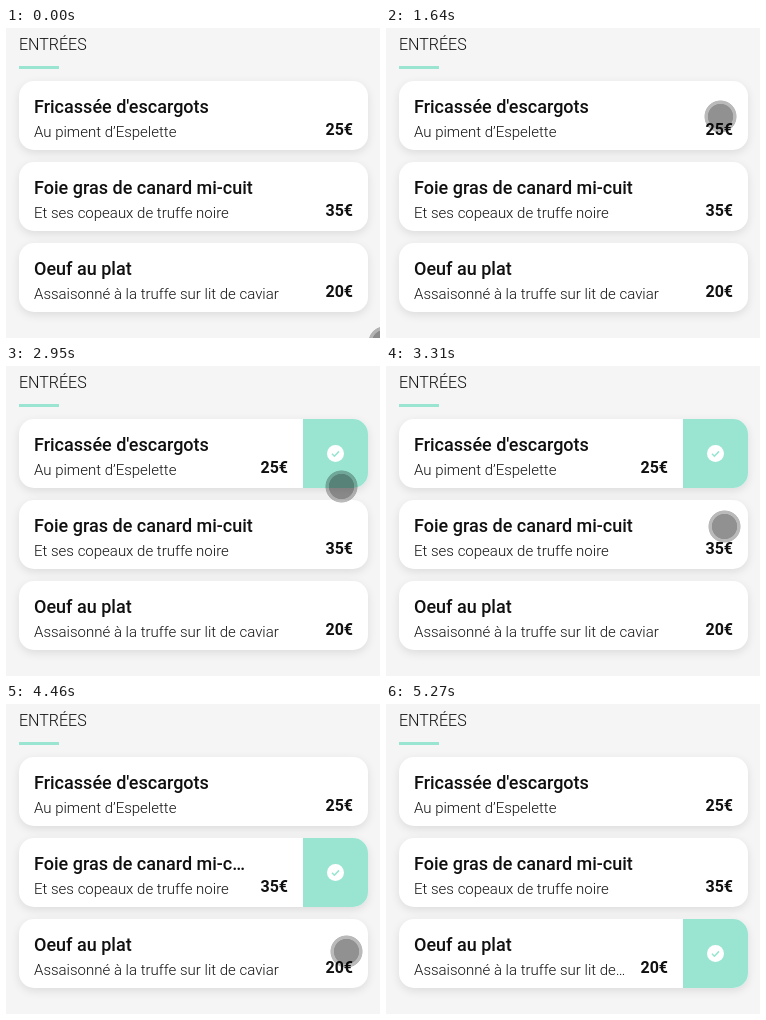
An HTML page that plays this animation: 374x310 px, repeating every 6.33 s.

```html
<!DOCTYPE html>
<html lang="fr">
<head>
<meta charset="utf-8">
<title>Entrées</title>
<style>
@property --open { syntax: "<length>"; inherits: true; initial-value: 0px; }

html, body { margin: 0; width: 100%; height: 100%; overflow: hidden; }
body { background: #f5f5f5; color: #101010; font-family: Roboto, sans-serif; }
.stage { position: relative; width: 374px; height: 310px; overflow: hidden; }

h1 {
  position: absolute; left: 13px; top: 7px; margin: 0;
  font-size: 16px; font-weight: 300; line-height: 20px;
}
.bar { position: absolute; left: 13px; top: 38px; width: 40px; height: 3px; background: #99e5d1; }

.card {
  position: absolute; left: 13px; width: 349px; height: 69px;
  border-radius: 15px; background: #fff; overflow: hidden;
  box-shadow: 0 3px 10px rgba(0, 0, 0, .1);
  animation: 6330ms infinite;
}
.card:nth-of-type(2) { top: 53px; animation-name: first; }
.card:nth-of-type(3) { top: 134px; animation-name: second; }
.card:nth-of-type(4) { top: 215px; animation-name: third; }

h2, p {
  position: absolute; left: 15px; right: calc(57px + var(--open) + 65px - 65px); margin: 0;
  overflow: hidden; white-space: nowrap; text-overflow: ellipsis;
}
h2 { top: 15px; font-size: 18px; font-weight: 500; line-height: 22px; }
p { top: 42px; font-size: 15px; font-weight: 300; line-height: 18px; }
b {
  position: absolute; top: 39px; right: calc(15px + var(--open));
  font-size: 16px; font-weight: 700; line-height: 20px;
}
.check {
  position: absolute; top: 0; right: calc(var(--open) - 65px);
  width: 65px; height: 69px; background: #99e5d1;
}
.check svg { position: absolute; left: 24px; top: 26px; width: 17px; height: 17px; }

.cursor {
  position: absolute; width: 33px; height: 33px; margin: -16.5px;
  background: radial-gradient(circle, rgba(0, 0, 0, .43) 12.3px, rgba(0, 0, 0, .27) 13px 15.7px, transparent 16.4px);
  animation: across 6330ms infinite, down 6330ms infinite;
}

@keyframes first {
  0%, 33.33% { --open: 0px; }
  37.36%, 54.58% { --open: 65px; }
  58.29%, 100% { --open: 0px; }
}
@keyframes second {
  0%, 54.58% { --open: 0px; }
  58.29%, 72.67% { --open: 65px; }
  76.38%, 100% { --open: 0px; }
}
@keyframes third {
  0%, 72.67% { --open: 0px; }
  76.38%, 100% { --open: 65px; }
}

@keyframes across {
  0%, 3.16% { left: 378px; animation-timing-function: ease-in; }
  4.1% { left: 394px; animation-timing-function: step-end; }
  20.83% { left: 339px; animation-timing-function: ease-in-out; }
  22.9% { left: 327px; animation-timing-function: ease-in-out; }
  25.9%, 41.55% { left: 334px; animation-timing-function: ease-in-out; }
  52.28%, 59.72% { left: 338px; animation-timing-function: ease-in-out; }
  65.4% { left: 342px; animation-timing-function: ease-in-out; }
  70.45%, 76.62% { left: 340px; animation-timing-function: cubic-bezier(.32, 0, .67, 0); }
  83.25%, 100% { left: 379px; }
}
@keyframes down {
  0%, 3.16% { top: 314px; animation-timing-function: ease-in; }
  4.1% { top: 330px; animation-timing-function: step-end; }
  20.83% { top: 15px; animation-timing-function: cubic-bezier(.2, .4, .5, 1); }
  25.9%, 41.55% { top: 88px; animation-timing-function: ease-in-out; }
  52.28%, 59.72% { top: 160px; animation-timing-function: cubic-bezier(.45, 0, .55, 1); }
  70.45%, 76.62% { top: 247px; animation-timing-function: cubic-bezier(.32, 0, .67, 0); }
  83.25%, 100% { top: 331px; }
}
</style>
</head>
<body>
<div class="stage">
  <h1>ENTRÉES</h1>
  <div class="bar"></div>
  <div class="card">
    <h2>Fricassée d'escargots</h2>
    <p>Au piment d’Espelette</p>
    <b>25€</b>
    <div class="check"><svg viewBox="0 0 17 17"><circle cx="8.5" cy="8.5" r="8.5" fill="#fff"/><path d="M5 8.8l2.4 2.4 4.6-4.8" fill="none" stroke="#99e5d1" stroke-width="1.6"/></svg></div>
  </div>
  <div class="card">
    <h2>Foie gras de canard mi-cuit</h2>
    <p>Et ses copeaux de truffe noire</p>
    <b>35€</b>
    <div class="check"><svg viewBox="0 0 17 17"><circle cx="8.5" cy="8.5" r="8.5" fill="#fff"/><path d="M5 8.8l2.4 2.4 4.6-4.8" fill="none" stroke="#99e5d1" stroke-width="1.6"/></svg></div>
  </div>
  <div class="card">
    <h2>Oeuf au plat</h2>
    <p>Assaisonné à la truffe sur lit de caviar</p>
    <b>20€</b>
    <div class="check"><svg viewBox="0 0 17 17"><circle cx="8.5" cy="8.5" r="8.5" fill="#fff"/><path d="M5 8.8l2.4 2.4 4.6-4.8" fill="none" stroke="#99e5d1" stroke-width="1.6"/></svg></div>
  </div>
  <div class="cursor"></div>
</div>
</body>
</html>
```
